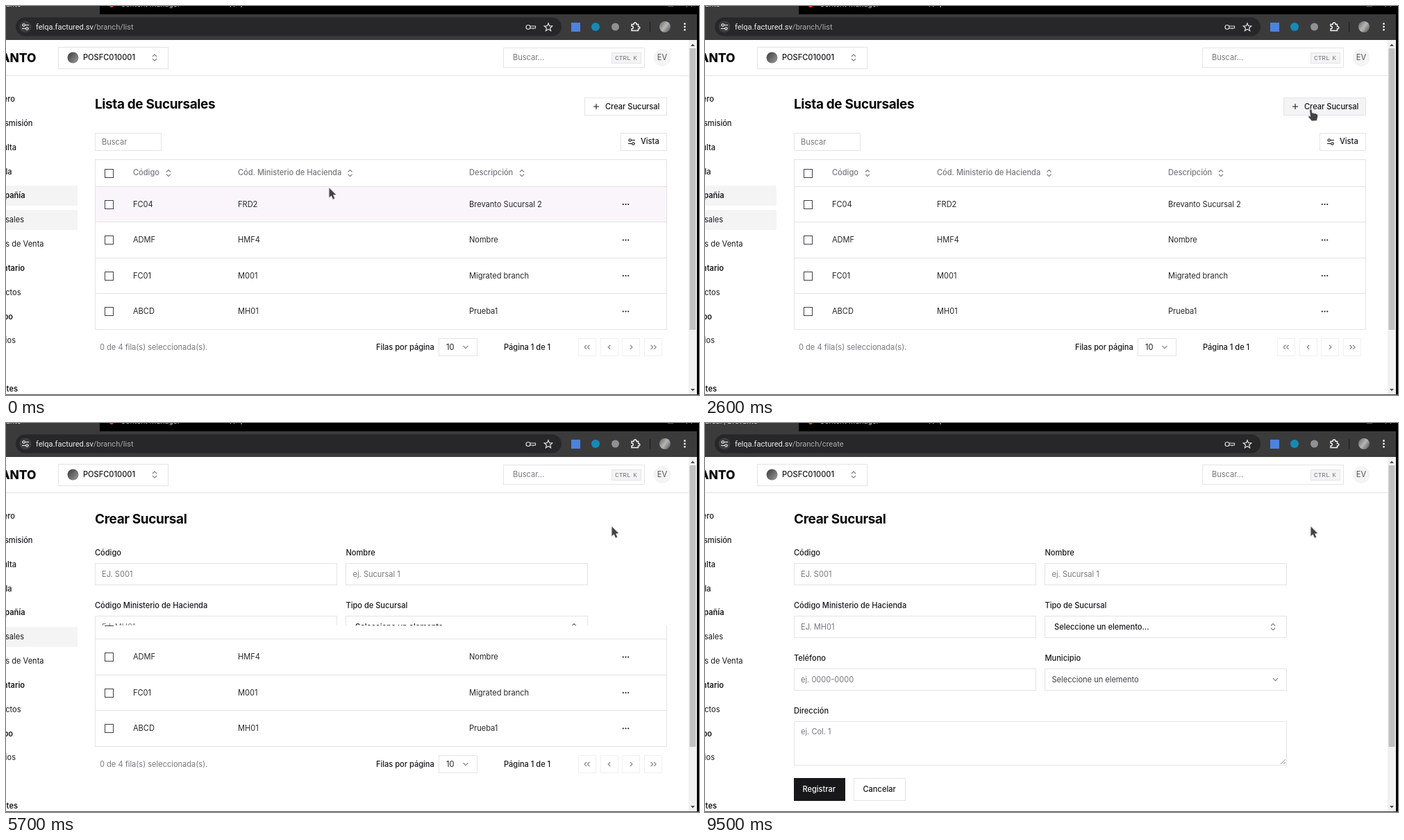
An HTML page with a canvas for the animation above (9700 ms loop, 998 px wide and 561 px high).

```html
<!DOCTYPE html>
<html lang="es">
<head>
<meta charset="utf-8">
<title>Sucursales</title>
<style>
html, body { margin: 0; width: 100%; height: 100%; overflow: hidden; background: #fff; }
canvas { display: block; }
</style>
</head>
<body>
<canvas id="stage" width="998" height="561"></canvas>
<script>
const ctx = document.getElementById('stage').getContext('2d');
const LOOP = 9700, SIZE = 11.06;
const INK = '#18181b', GRAY = '#77777f', LINE = '#e4e4e7', SOFT = '#f4f4f5', HOVER = '#f9f5fb';
const HEADING = { size: 18.96, weight: 700, track: -0.019, color: '#09090b' };

function text(str, x, cy, o = {}) {
  const { size = SIZE, weight = 400, color = INK, align = 'left', font = 'Inter, sans-serif', track = 0 } = o;
  ctx.font = `${weight} ${size}px ${font}`;
  ctx.letterSpacing = `${track * size}px`;
  ctx.textAlign = align;
  ctx.fillStyle = color;
  ctx.fillText(str, x, cy + size * 0.36);
  return ctx.measureText(str).width;
}
function rect(x, y, x2, y2, color) {
  ctx.fillStyle = color;
  ctx.fillRect(x, y, x2 - x, y2 - y);
}
function box(x, y, x2, y2, fill = '#fff', stroke = LINE) {
  rect(x, y, x2, y2, fill);
  ctx.strokeStyle = stroke;
  ctx.lineWidth = 1;
  ctx.strokeRect(x + 0.5, y + 0.5, x2 - x - 1, y2 - y - 1);
}
function circle(x, y, r, fill) {
  ctx.beginPath();
  ctx.arc(x, y, r, 0, 7);
  ctx.fillStyle = fill;
  ctx.fill();
}
function ring(x, y, r, color, width = 1) {
  ctx.beginPath();
  ctx.arc(x, y, r, 0, 7);
  ctx.strokeStyle = color;
  ctx.lineWidth = width;
  ctx.stroke();
}
function pill(x, y, w, h, r, fill) {
  ctx.beginPath();
  ctx.roundRect(x, y, w, h, r);
  ctx.fillStyle = fill;
  ctx.fill();
}
function stroke(d, x, y, color = GRAY, width = 1) {
  ctx.save();
  ctx.translate(x, y);
  ctx.strokeStyle = color;
  ctx.lineWidth = width;
  ctx.stroke(new Path2D(d));
  ctx.restore();
}
const sorter = (x, y) => stroke('M-3 -1.7 L0 -4.6 L3 -1.7 M-3 1.7 L0 4.6 L3 1.7', x, y, '#6b6b73', 1.1);
const chevron = (x, y) => stroke('M-3.5 -2 L0 1.8 L3.5 -2', x, y, '#6b6b73', 1.1);
function sliders(x, y, color) {
  stroke('M-4.5 -2.5 H-4 M-.5 -2.5 H5 M-5 2.5 H.5 M4 2.5 H4.5', x, y, color, 1.2);
  ring(x - 2.3, y - 2.5, 1.7, color, 1.1);
  ring(x + 2.3, y + 2.5, 1.7, color, 1.1);
}

function browser(t) {
  const creating = t >= 5800, light = '#dedede';
  const ui = { font: 'Roboto, sans-serif', size: 11.1 };
  rect(0, 0, 998, 14, '#000');
  pill(-20, -10, 155, 30, 6, '#3b3b3c');
  rect(0, 12, 996, 49, '#3b3b3c');
  const title = t >= 6200 ? ['Crear Sucursal | Brevanto', 76] : ['Sucursales | Brevanto', 22];
  text(title[0], title[1], -3, { ...ui, color: light, align: 'right' });
  text('Content Manager', 165, -3, { ...ui, color: '#c8c8c8' });
  circle(152, -1, 3, '#e3492b');
  stroke('M-3 -3 L3 3 M3 -3 L-3 3', 326, -2, light);
  stroke('M-4 0 H4 M0 -4 V4', 339, -2, light);
  stroke('M-4 0 H4 M22 -3 H30 V1 H22 Z M49 -6 L57 2 M57 -6 L49 2', 931, -1, '#aaa');

  pill(14, 16.5, 786, 27, 13.5, '#27272a');
  circle(28, 30, 8.5, '#3d3d40');
  sliders(28, 30, '#eee');
  const hostWidth = text('felqa.factured.sv', 43, 30, { ...ui, color: '#ededed' });
  text(creating ? '/branch/create' : '/branch/list', 43 + hostWidth, 30, { ...ui, color: '#aaabad' });
  ring(752, 30.5, 3, light, 1.2);
  stroke('M3 -1.5 H10.5 V1.5 H3 M7 1.5 V3', 752, 30.5, light, 1.1);
  stroke('M0 -5.6 L1.6 -1.8 L5.7 -1.5 L2.6 1.2 L3.6 5.2 L0 3 L-3.6 5.2 L-2.6 1.2 L-5.7 -1.5 L-1.6 -1.8 Z', 781, 30.5, light, 1.2);
  rect(814, 24, 827, 37, '#4c83df');
  circle(849, 30, 6, '#168ab5');
  circle(877.5, 30, 5.5, '#8f9193');
  stroke('M-5 -3.5 H-2 C-2 -7 2 -7 2 -3.5 H4.5 V-.5 C7.5 -.5 7.5 3 4.5 3 V5.5 H-5 V3 C-2 3 -2 -1 -5 -1 Z', 906, 30, '#f1f1f1', 1.5);
  rect(927, 23, 928, 37, '#19191a');
  const photo = ctx.createLinearGradient(941, 24, 957, 36);
  photo.addColorStop(0, '#6d6d6d');
  photo.addColorStop(0.5, '#b6b6b4');
  photo.addColorStop(1, '#565656');
  circle(949, 30, 8, photo);
  for (const dy of [-4.3, 0, 4.3]) circle(977.5, 30 + dy, 1.4, '#eee');
}

function header() {
  rect(0, 100, 983, 101, LINE);
  text('BREVANTO', 43.5, 74.5, { size: 17.4, weight: 800, align: 'right', color: '#09090b' });
  box(75, 59, 234, 91);
  const grad = ctx.createLinearGradient(90, 69, 103, 80);
  grad.addColorStop(0, '#454545');
  grad.addColorStop(1, '#929292');
  circle(96.5, 74.5, 8, grad);
  text('POSFC010001', 111, 74.5, { weight: 500 });
  sorter(214, 74.5);
  box(716, 60, 920, 89);
  text('Buscar...', 730, 74.5, { color: GRAY });
  box(872, 67, 915, 83, SOFT);
  const mono = { font: '"Liberation Mono", monospace', color: GRAY };
  text('CTRL', 877, 74.5, { ...mono, size: 9.48 });
  text('K', 903.5, 74.5, { ...mono, size: 8.5 });
  circle(945, 74.5, 12.5, SOFT);
  text('EV', 945, 74.5, { color: '#52525b', align: 'center' });
}

const MENU = [
  ['Tablero', 13, 500], ['Transmisión', 38.5, 500], ['Consulta', 15, 500], ['Anula', 8.5, 500],
  ['Compañía', 27.5, 600], ['Sucursales', 26, 400], ['Puntos de Venta', 54.5, 400], ['Inventario', 27, 600],
  ['Productos', 21.5, 400], ['Equipo', 10, 600], ['Usuarios', 14, 400], null, ['Clientes', 17, 600]
];
function sidebar(onList) {
  if (onList) {
    rect(0, 259, 103, 288, SOFT);
    rect(0, 294, 103, 323, SOFT);
  }
  MENU.forEach((item, i) => item &&
    text(item[0], item[1], 134 + i * 34.85, { weight: item[2], align: 'right' }));
}

const ROWS = [
  ['FC04', 'FRD2', 'Brevanto Sucursal 2'], ['ADMF', 'HMF4', 'Nombre'],
  ['FC01', 'M001', 'Migrated branch'], ['ABCD', 'MH01', 'Prueba1']
];
const COLS = [183, 334, 667];
const checkbox = y => box(142, Math.round(y - 6.5), 155, Math.round(y + 6.5), '#fff', '#3f3f46');

function list(t) {
  text('Lista de Sucursales', 128, 141.5, HEADING);
  box(833, 132, 952, 158, t >= 2400 ? SOFT : '#fff');
  stroke('M-4 0 H4 M0 -4 V4', 850, 145, INK, 1.1);
  text('Crear Sucursal', 863, 145, { weight: 500 });
  box(128, 183, 224, 209);
  text('Buscar', 138, 196, { color: GRAY });
  box(885, 183, 952, 209);
  sliders(901, 196, INK);
  text('Vista', 914, 195.5, { weight: 500 });

  box(128, 221, 952, 467);
  if (t < 1300) rect(129, 261, 951, 312, HOVER);
  else if (t < 1900) rect(129, 222, 951, 260, HOVER);
  else if (t < 2000) rect(129, 222, 951, 260, '#fcfafd');
  checkbox(241);
  [['Código', 234], ['Cód. Ministerio de Hacienda', 495.5], ['Descripción', 743]].forEach(([name, x], i) => {
    text(name, COLS[i], 240.5, { weight: 500, color: GRAY });
    sorter(x, 241);
  });
  ROWS.forEach((row, i) => {
    const y = 286 + i * 51.5;
    rect(128, Math.floor(y - 26), 951, Math.floor(y - 25), LINE);
    checkbox(y);
    row.forEach((cell, c) => text(cell, COLS[c], y, { color: '#27272a' }));
    for (const dx of [-3.7, 0, 3.7]) circle(892.5 + dx, y, 1.1, INK);
  });

  text('0 de 4 fila(s) seleccionada(s).', 135, 492, { color: GRAY });
  text('Filas por página', 533, 492, { weight: 500 });
  box(623, 479, 679, 505);
  text('10', 634, 492);
  chevron(662, 492);
  text('Página 1 de 1', 717, 492, { weight: 500 });
  const arrows = [
    'M-1 -3 L-4 0 L-1 3 M3.5 -3 L.5 0 L3.5 3', 'M1.5 -3 L-1.5 0 L1.5 3',
    'M-1.5 -3 L1.5 0 L-1.5 3', 'M-3.5 -3 L-.5 0 L-3.5 3 M1 -3 L4 0 L1 3'
  ];
  arrows.forEach((d, i) => {
    const x = 837 + i * 31.7, left = Math.round(x - 13);
    box(left, 479, left + 26, 505, '#fff', '#f0f0f2');
    stroke(d, x, 492, '#808086', 1.1);
  });
}

function field(label, x, y, hint, style = { color: GRAY }, hintX = x + 10) {
  text(label, x, y, { weight: 500 });
  box(Math.floor(x), y + 15, Math.floor(x) + 349, y + 47);
  text(hint, hintX, y + 31.5, style);
}
function form() {
  text('Crear Sucursal', 128, 138.5, HEADING);
  field('Código', 128, 187, 'EJ. S001');
  field('Nombre', 489.5, 187, 'ej. Sucursal 1');
  field('Código Ministerio de Hacienda', 128, 263, 'EJ. MH01');
  field('Tipo de Sucursal', 489.5, 263, 'Seleccione un elemento...', { weight: 500 }, 503);
  sorter(818, 294);
  field('Teléfono', 128, 339, 'ej. 0000-0000');
  field('Municipio', 489.5, 339, 'Seleccione un elemento', { color: '#3f3f46' });
  chevron(821.5, 370);
  text('Dirección', 128, 415, { weight: 500 });
  box(128, 430, 838, 494);
  text('ej. Col. 1', 138, 445.5, { color: GRAY });
  stroke('M-5 2 L2 -5 M-1 2 L2 -1', 834, 490, '#777', 0.8);
  rect(128, 512, 202, 545, INK);
  text('Registrar', 140.5, 528.5, { weight: 500, color: '#fafafa' });
  box(214, 512, 289, 545);
  text('Cancelar', 227.5, 528.5, { weight: 500 });
}

function page(t, onList) {
  rect(0, 49, 983, 561, '#fff');
  header();
  sidebar(onList);
  onList ? list(t) : form();
}
function clipped(y, y2, draw) {
  ctx.save();
  ctx.beginPath();
  ctx.rect(0, y, 998, y2 - y);
  ctx.clip();
  draw();
  ctx.restore();
}
function frameEdges() {
  rect(983, 49, 995, 561, '#f1f1f1');
  rect(984.5, 61, 993.5, 467, '#c1c1c1');
  ctx.fillStyle = '#505050';
  ctx.fill(new Path2D('M986 58 L989 54.5 L992 58 Z M986 552 L992 552 L989 555.5 Z'));
  rect(995, 0, 998, 561, '#000');
  rect(0, 560, 998, 561, '#4a4a4a');
}

const PATH = [[400, 465, 262], [1200, 731, 254], [1600, 800, 232], [1900, 848, 198], [2400, 872, 149]];
function pointerAt(t) {
  const i = PATH.findIndex(p => p[0] > t);
  if (i === 0) return PATH[0].slice(1);
  if (i < 0) return PATH[PATH.length - 1].slice(1);
  const [t0, x0, y0] = PATH[i - 1], [t1, x1, y1] = PATH[i], k = (t - t0) / (t1 - t0);
  return [x0 + (x1 - x0) * k, y0 + (y1 - y0) * k];
}
const ARROW = new Path2D('M.5 .5 L.5 14 L3.6 11.3 L6 16.6 L8.2 15.5 L5.9 10.5 L10 10 Z');
const HAND = new Path2D('M-1 1 Q.2 -.6 1.5 1 L2.2 5.8 L4 5.3 L5.3 6.5 L7 6 L8.2 7.3 L9.6 7.2 Q10.6 8.5 10 11 L8.8 16 L2 16.5 L-2.4 11.5 Q-3.4 9.5 -1.6 9.8 L.2 11 Z');
function pointer(t) {
  const [x, y] = pointerAt(t);
  const shape = t >= 2400 && t < 5700 ? HAND : ARROW;
  ctx.save();
  ctx.translate(x, y);
  ctx.lineJoin = 'round';
  ctx.strokeStyle = '#e2e2e2';
  ctx.lineWidth = 1.8;
  ctx.stroke(shape);
  ctx.fillStyle = '#434345';
  ctx.fill(shape);
  ctx.restore();
}

function render(now) {
  const t = Math.floor((now % LOOP) / 100) * 100;
  browser(t);
  // The page switches from the top down, one strip ahead of the rest.
  const split = t < 5700 ? 49 : t < 5800 ? 292 : 561;
  if (split > 49) clipped(49, split, () => page(t, false));
  if (split < 561) clipped(split, 561, () => page(t, true));
  frameEdges();
  pointer(t);
}

const start = performance.now();
function tick() {
  render(performance.now() - start);
  requestAnimationFrame(tick);
}
tick();
</script>
</body>
</html>
```
